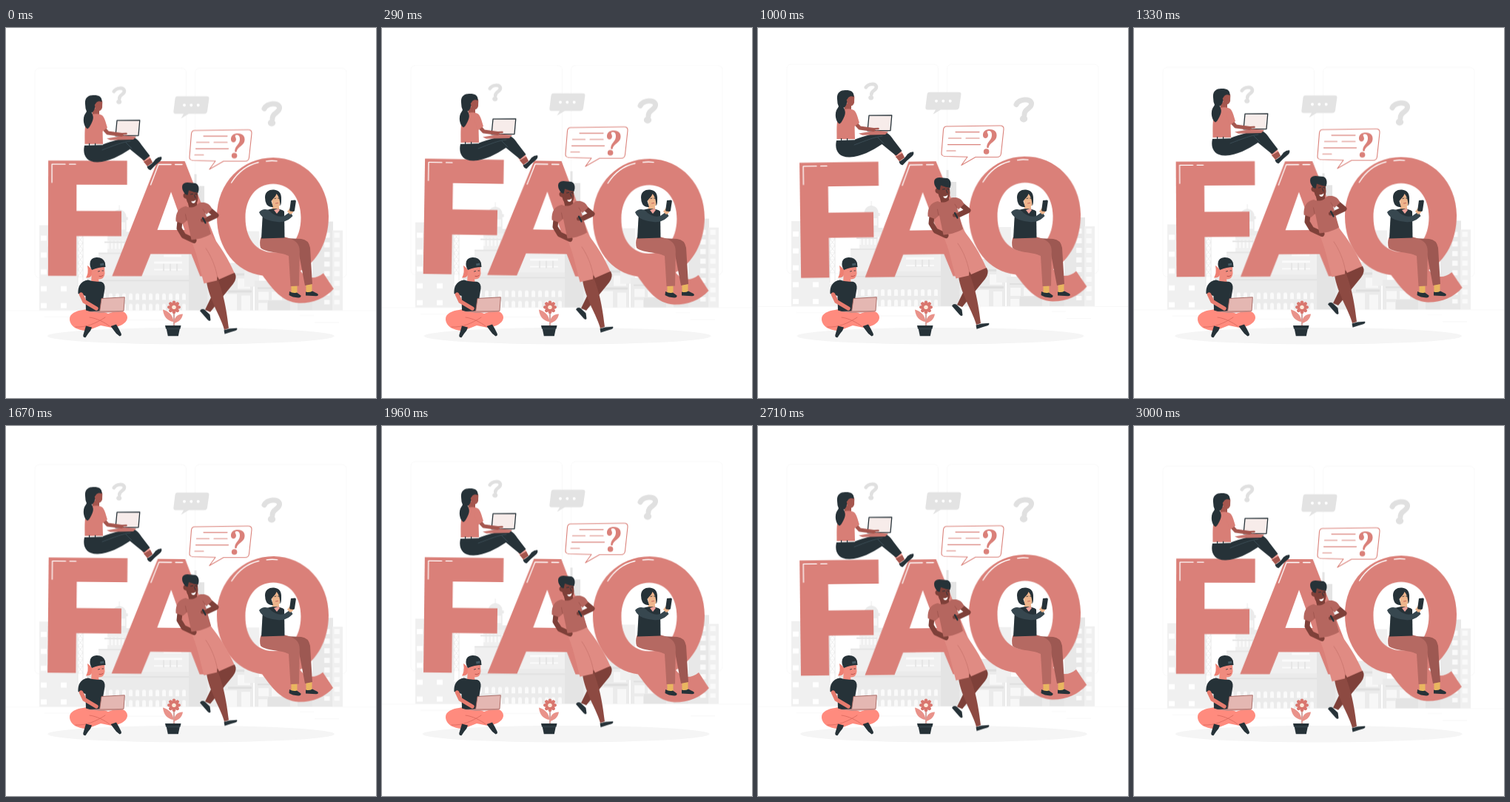
An HTML page for the animation above (3.04 s loop, 500 by 500 pixels).

```html
<!DOCTYPE html>
<html lang="en">
<head>
<meta charset="utf-8">
<title>FAQ</title>
<style>
  html, body { margin: 0; width: 100%; height: 100%; overflow: hidden; background: #fff; }
  svg { display: block; width: 100vw; height: 100vh; }

  .float, .drift, .wind, .shake {
    animation: float 1.5s linear infinite paused;
    animation-delay: calc(var(--clock, 42) * -1ms);
    transform-origin: 250px 250px;
  }
  .drift { animation-duration: 3s; }
  .wind { animation-name: wind; }
  .shake { animation-name: shake; }

  @keyframes float { 50% { transform: translateY(-10px); } }
  @keyframes wind {
    0%, 100% { transform: rotate(0deg); }
    25% { transform: rotate(1deg); }
    75% { transform: rotate(-1deg); }
  }
  @keyframes shake {
    0%, 100% { transform: translateX(0); }
    10%, 90% { transform: translateX(-1px); }
    20%, 80% { transform: translateX(2px); }
    30%, 50%, 70% { transform: translateX(-4px); }
    40%, 60% { transform: translateX(4px); }
  }

  .ink { fill: #263238; }
  .rose { fill: #da8079; }
  .line { fill: none; stroke-linecap: round; stroke-linejoin: round; }
</style>
</head>
<body>
<svg viewBox="0 0 500 500" xmlns="http://www.w3.org/2000/svg">
  <defs>
    <pattern id="panes" x="47" y="280" width="27" height="22.8" patternUnits="userSpaceOnUse">
      <path d="M0 1h8v7H0z" fill="#fff"/>
    </pattern>
    <pattern id="slots" x="428" y="277" width="13.5" height="13" patternUnits="userSpaceOnUse">
      <path d="M2 0h7.5v7H2z" fill="#fafafa"/>
    </pattern>
    <pattern id="arches" x="128" y="358" width="9" height="14" patternUnits="userSpaceOnUse">
      <path d="M2 10V3.5a2.5 2.5 0 0 1 5 0V10z" fill="#fafafa"/>
    </pattern>
    <pattern id="columns" x="126" y="284" width="5" height="60" patternUnits="userSpaceOnUse">
      <path d="M1 3h2.4v12H1z" fill="#fafafa"/>
    </pattern>
    <pattern id="truss" x="97" y="282" width="7" height="9" patternUnits="userSpaceOnUse">
      <path d="M0 0L7 9M7 0L0 9M0 0H7" stroke="#e3e3e3" stroke-width=".7"/>
    </pattern>
  </defs>

  <!-- room, skyline and floor -->
  <g class="float">
    <g fill="none" stroke="#ebebeb" stroke-width=".3">
      <rect x="39" y="55" width="204.5" height="282.8" rx="5.7"/>
      <rect x="255.5" y="55" width="204.5" height="282.8" rx="5.7"/>
    </g>
    <g fill="#f0f0f0">
      <path d="M45 267h52v115H45z"/>
      <path d="M45 267h52v115H45z" fill="url(#panes)"/>
      <path d="M97 272h7v65h-7z" fill="url(#truss)"/>
      <path d="M97 282V350M104 282V350" stroke="#e3e3e3" stroke-width=".8"/>
      <path d="M152.6 240h1v6c6 1 9 5 9 10h2v4h-2v16h6v9h-31v-9h6v-16h-2v-4h2c0-5 3-9 9-10z" fill="#ebebeb"/>
      <path d="M146 263h15v10h-15z" fill="#f7f7f7"/>
      <path d="M137 282h68v54h-68zM125 306h20v30h-20z"/>
      <path d="M137 288h40v18h-40z" fill="url(#columns)"/>
      <path d="M133 289h28v2h-28zM125 304h40v2h-40z" fill="#e6e6e6"/>
      <path d="M190 305h58v34h-58z"/>
      <path d="M213 307h24v3h-24zM200 316h38v3h-38zM200 326h38v2h-38z" fill="#fafafa"/>
      <path d="M212 319h2v10h-2zM221 319h2v10h-2zM230 319h2v10h-2z" fill="#e6e6e6"/>
      <path d="M109 335h139v47H109z" fill="#ebebeb"/>
      <path d="M109 341h139v1.5H109z" fill="#e0e0e0"/>
      <path d="M128 358h117v24H128z" fill="url(#arches)"/>
      <path d="M84 352h44v30H84z" fill="#f0f0f0"/>
      <path d="M254.5 198h3v16h-3zM250 214h18v30h-18zM247 244h25v138h-25z" fill="#e4e4e4"/>
      <path d="M272 318h62v64h-62z" fill="#ebebeb"/>
      <path d="M276 332h56v3h-56zM300 355h32v3h-32z" fill="#dfdfdf"/>
      <path d="M313 339h17v14h-17zM292 360h20v22h-20zM318 362h12v20h-12z" fill="#f7f7f7"/>
      <path d="M322 275h20v75h-20z"/>
      <path d="M336 342h92v40h-92z" fill="#ebebeb"/>
      <path d="M340 351h32v2h-32z" fill="#e0e0e0"/>
      <path d="M341 357h14v11h-14zM359 357h14v11h-14zM341 372h12v10h-12z" fill="#f7f7f7"/>
      <path d="M354 369h30v13h-30zM394 367h41v15h-41z" fill="#e4e4e4"/>
      <path d="M414 262h28v120h-28z" fill="#e8e8e8"/>
      <path d="M441 274h14v108h-14z"/>
      <path d="M428 277h27v97h-27z" fill="url(#slots)"/>
    </g>
    <path d="M0 382.4h500M417 398.5h33M397 389.2h19M52 390.9h43M131 395h94" fill="none" stroke="#ebebeb" stroke-width=".35"/>
  </g>

  <ellipse class="shake" cx="250" cy="416.2" rx="193.9" ry="11.3" fill="#f5f5f5"/>

  <!-- letters -->
  <g class="wind">
    <path class="rose" d="M57 179.4H163.6V212H95.3V247.5H156V281.5H95.3V335.2H57z"/>
    <path class="rose" fill-rule="evenodd" d="M204.500 180H241.500L302.500 335.500H262.500L250.500 305.500H195.500L183.500 335.500H143.500zM223 221.500L204.500 273H241.500z"/>
    <path class="rose" fill-rule="evenodd" d="M361 175C403 175 436 209 436 254C436 288 421 315 398 328C407 339 418 340 429 331L443 352C432 365 414 372 396 371.500C373 370 361 353 347 334.500C311 330 285 298 285 255C285 209 319 175 361 175zM361 210.500C338 210.500 323.500 230 323.500 256C323.500 284 338 303 361 303C384 303 398.500 284 398.500 256C398.500 230 384 210.500 361 210.500z"/>
    <path class="line" stroke="#fff" stroke-width="1.3" d="M62 209V184.300H80M85.500 184.300H94M195.500 212L206 184.500H223M228.500 184.500H238M304.500 209Q318 187 341 181.500M351.500 179.800Q358 178.800 366 179.600"/>
  </g>

  <!-- floating marks -->
  <g class="float">
    <g class="line" stroke="#e0e0e0" stroke-linecap="butt">
      <path stroke-width="4.600" d="M145.800 86.300C149 81 158.500 80.400 159.900 85C160.800 90.800 152.800 90 153.200 96.200"/>
      <path stroke-width="7" d="M349 109.500C353 102 367.500 100.500 369.500 107.500C370.500 115.500 359.500 114.500 360 123"/>
    </g>
    <g fill="#e0e0e0">
      <ellipse cx="152.700" cy="100.300" rx="3.500" ry="3.100"/>
      <ellipse cx="359" cy="128.700" rx="5.200" ry="4.700"/>
    </g>
    <path fill="#e3e3e3" d="M231.500 92.700H271.500Q274.800 92.700 274.400 96L272 113Q271.500 116.400 268 116.400H247L236.500 122.700L240 116.400H229Q225.900 116.400 226.400 113L228.500 96Q229 92.700 231.500 92.700z"/>
    <g fill="#fff"><circle cx="241" cy="104.800" r="2"/><circle cx="250.300" cy="104.800" r="2"/><circle cx="259.700" cy="104.800" r="2"/></g>
    <path fill="#fff" stroke="#da8079" stroke-width="1.100" stroke-linejoin="round" d="M255 139L327 138Q332.500 138 332 143L328.500 175.500Q328 180.500 323 180.500H294L274.800 191.500L283 180.300L252.500 179.500Q247.500 179 248 174.500L250.500 143.500Q251 139 255 139z"/>
    <path class="line" stroke="#da8079" stroke-width="1.100" d="M267 146.600H299M257.500 155H274.500M281 155H299M256.500 163.600H300.500M255 172H267"/>
    <path class="rose" d="M304 151.500C303.500 145.500 308 143 313.500 143C319.500 143 323 146.500 322.500 152C322 160 312.500 160.500 311.500 168H309.300C308.300 160.500 315.500 158.500 316 151.500C316.300 147 314.500 145 311.800 145C309.500 145 309 146.500 310.300 148.500C312 152 310 155 307.500 155C305.500 155 304.200 153.500 304 151.500z"/>
    <circle class="rose" cx="308.600" cy="173" r="3.800"/>
  </g>

  <!-- woman with laptop -->
  <g class="drift">
    <path fill="#f4a39b" d="M184 178L193 172L198 182L191 187z"/>
    <path fill="#a5564e" d="M186 181L195 176L198 182L191 187z"/>
    <path class="ink" d="M190.500 187.500C195 186 200 181 202 177.500Q206 174 210 174.200Q211.300 177 208.500 180L201 186.500L195.500 192.300Q191.500 191.500 190.500 187.500z"/>
    <path class="ink" d="M106 159L130 158C144 152.500 158 149 169 147.500C175 147.500 179 152 183 158L194.500 173L186.500 179.500L167.500 164C154 173 139 181 124 181.500C109 182 103 172 106 159z"/>
    <path class="line" stroke="#455a64" stroke-width=".7" d="M130 165C146 159 158 154 168 153M170 163L162 155"/>
    <path fill="#a5564e" d="M116 110L126 108L126 119L117 121z"/>
    <path fill="#a5564e" d="M118 98Q128 93 130.300 100L130 108Q128 114 121 112z"/>
    <path fill="#d87e76" d="M115 117.500C121 115.500 129 116 131.500 120C134 124 135.500 130 136.500 134L130.500 139L131 157.500H106.500C107 146 104 125 115 117.500z"/>
    <path fill="none" stroke="#fff" stroke-width="1.100" d="M106.500 157.700H131"/>
    <path fill="#263238" d="M112 156h1.200v3h-1.200zM120 156h1.200v3h-1.200z"/>
    <path class="ink" d="M107 103C106 94 112 90.500 119 91C126 91 130 93.500 129.500 100C125 98 121 100 120.500 105C120 111 118 114 115.500 114.500C120 121 117 126 114.500 131C113 134 111.500 136 110 136.500C105 133 103.500 124 106 118L109 113Q107 109 107 103z"/>
    <circle cx="121.500" cy="104.500" r="1.700" fill="#a5564e"/>
    <path fill="#f7ecea" stroke="#263238" stroke-width="1.300" stroke-linejoin="round" d="M150 125.200L180.800 124.800L179 145.500L148 145.800z"/>
    <path fill="#c9756e" d="M136 149.500L160 145.500L176 147L172 151L141 151.800z"/>
    <path class="line" stroke="#a5564e" stroke-width="5" d="M132 136L137.500 142L156 144.500"/>
    <path class="line" stroke="#a5564e" stroke-width="2.500" d="M153 143.500L162.500 143"/>
    <path fill="#d87e76" d="M124 125Q131 121 133 126L137 135L129.500 140.500z"/>
  </g>

  <!-- leaning man -->
  <g class="drift">
    <path fill="#7e4039" d="M284 334L309 331Q313 338 307 346L276 384L269 381L284 350z"/>
    <path fill="#8d4a42" d="M271 343L286 339C291 352 297 370 301 406L295 408C292 394 274 366 271 343z"/>
    <path class="ink" d="M262 382.500Q264 379 268 380.500L275.500 387.500L276.500 395Q275 397.500 272 394z"/>
    <path class="ink" d="M294.500 408.500L302 406.500L312 405.700Q313.500 407.500 310 409.300L304 411L295.500 413.800z"/>
    <path fill="#e08b83" d="M249.500 286L276 278C289 294 301 313 308.500 331L288 340L285.500 335.500L285 341.500L267.500 345.500C262 325 258 304 249.500 286z"/>
    <path class="line" stroke="#c9756e" stroke-width=".8" d="M285.500 336C283 322 277 308 270 298"/>
    <path fill="#7e4039" d="M245 233L257 230L259 243L248 246z"/>
    <path class="line" stroke="#7e4039" stroke-width="7" d="M235 261L234 271L240 281L254 287.500"/>
    <path class="line" stroke="#7e4039" stroke-width="7" d="M275 246L284 253.500L268 261"/>
    <path fill="#b5665f" d="M243 241C250 244.500 257 242 261 236.500C269 235 275 237 278.500 245L271 252L269 250L277 278.500C268 284 258 286 250.500 286.500L245 260L239 265L229.500 261.500C229 250 233 243 243 241z"/>
    <path class="line" stroke="#9c534d" stroke-width=".8" d="M244 260L242.500 252M269 250L266 245"/>
    <path class="line" stroke="#7e4039" stroke-width="5" d="M272 259.500L265.500 260"/>
    <path class="line" stroke="#263238" stroke-width="2.400" d="M266 257L269.500 263.500"/>
    <path fill="#7e4039" d="M242 218L258.500 217.500L259.500 230Q259 240 252.500 240.500Q245 239 243.500 231Q239 230 239.500 226Q240 223 243 224z"/>
    <path class="ink" d="M238 215Q238 209.500 245 209L256 210Q261 212 260.500 219L259.500 223Q253 222 247 219.500L245.500 226L242.500 225Q238 220 238 215z"/>
    <path fill="#fff" d="M250 234.500Q254 235 256.500 232.500Q256 237 253 237Q251 236.700 250 234.500z"/>
    <path class="line" stroke="#263238" stroke-width=".9" d="M249.500 225L252.500 224.500M255.500 224.500L258 225M254.500 226L256 230"/>
  </g>

  <!-- woman with phone -->
  <g>
    <path fill="#e9b660" d="M385.500 347h8v11h-8zM405.500 345h8v12h-8z"/>
    <path class="ink" d="M383 356Q388 359 393 357.500L398.500 361.500Q399 364.500 395 364.500Q387 364 382.500 361zM405 356.500Q410 358 414 355.500L421 359Q423.500 362 419 362.300L405 361.500z"/>
    <path fill="#9d5852" d="M378 284L399 285Q409 286 411 297L414 346L404 348L396 306z"/>
    <path fill="#b56962" d="M344.500 283L377 282.500C390 286 397 290 396.800 302L396 348.500L384.500 349L382 308C370 302 351 304 344 297Q342 290 344.500 283z"/>
    <path fill="#eeb58c" d="M359 238L368 236L370 249L361 251z"/>
    <path class="ink" d="M347 249C354 243 371 243 376 248L376.500 283.500L345 284.500z"/>
    <path fill="#f0a39b" d="M362 246L366 251L370 246L368 244z"/>
    <path fill="#37474f" d="M342 249C346 244 353 244 357 248C362 253 369 256 376 254L384 248.500L387.500 254C382 260 375 263 367 262C358 261 346 259 342 249z"/>
    <path fill="#eeb58c" d="M380 248L385.500 241L390 243.500L387.500 250L384 252z"/>
    <path class="ink" d="M385 233L390.500 232.600Q392 232.800 391.800 234.500L390 246.500Q389.700 248 388 248L384 247.600Q383 247.400 383.200 246z"/>
    <path fill="#eeb58c" d="M358 225L369 223L371.500 232L370 240Q365 243 360 239z"/>
    <path class="ink" d="M350 229C350 221 356 218 362 218.500C369 219 372.500 224 372 231C372 236 372 238 370.500 240.500C370.500 234 369 228 365.500 224C364 229 360 231 358.500 234L361 242Q355 242.500 352 238Q350 234 350 229z"/>
    <path class="line" stroke="#263238" stroke-width=".8" d="M363 230.500L365 230M367.500 230L369 230.300"/>
    <path class="line" stroke="#c9655c" stroke-width="1" d="M364.500 237L367.500 236.500"/>
  </g>

  <!-- boy with laptop -->
  <g>
    <path fill="#ee7f72" d="M110 321C114 324 117 326 117 332Q115 338 108 337.500Q112 332 110 321z"/>
    <path fill="#f08b7e" d="M116 324L133 322L133.500 332Q132.500 340 125 339.500L126 346L115 346z"/>
    <path class="ink" d="M113.500 318Q114 310.500 122 310Q131 309.500 133.800 317L134.500 323Q125 323 116 327Q113 322 113.500 318z"/>
    <path fill="#455a64" d="M127 318.500L132 317.500L132.500 320.500L127.500 321.500z"/>
    <path class="line" stroke="#263238" stroke-width=".8" d="M124.500 329L126.500 328.500M130 328L131.500 328"/>
    <path class="line" stroke="#b84f48" stroke-width=".9" d="M126 335.500Q129 336.500 131 334.500"/>
    <path fill="#ff8b7e" d="M104 381C115 378 130 383 138 386L150 382C160 381 164.500 387 164 392C163 400 152 404 143 405L128 402L110 409C95 409 86 402 86 393C86 386 95 382 104 381z"/>
    <path class="line" stroke="#dd6b60" stroke-width=".9" d="M94 404C108 405 122 399 134 391M140 403C134 398 122 392 113 391"/>
    <path class="ink" d="M108 402.500L116 404.500Q115 409 111 413L107.500 418.200Q104 418.500 104.300 415zM141.500 403L149 400.500Q152.500 406 155.500 412.500Q157 416 153.500 416.500Q149 414 146 409z"/>
    <path class="ink" d="M111 340.500C118 343 125 342.500 129 343Q134 345 133.500 352L131.500 364L129 382Q117 385 108 381.500L107.500 362L97.500 359C97 350 100 342 111 340.500z"/>
    <path class="line" stroke="#e67b6e" stroke-width="5.400" d="M101.500 360L106 369.500L122 379"/>
    <path fill="#e4b7b2" stroke="#a4645e" stroke-width=".9" stroke-linejoin="round" d="M129 365.500L160.300 363.800L159 382.300L126.500 383.300z"/>
    <path fill="#c78c87" d="M110 383L126.500 382.500L159 382.200L157 383.800L127 385z"/>
  </g>

  <!-- potted flower -->
  <g>
    <path class="line" stroke="#b5665f" stroke-width="1.200" d="M227 402V382"/>
    <path fill="#e9928a" d="M226.500 397C218 396 213 390 212 380.500C220 383 226 388 226.500 397zM227 399C227 391 231 387 239 386.500C238 393 234 397 227 399z"/>
    <g id="petals" transform="translate(227 377.300)"></g>
    <circle cx="227" cy="377.300" r="2.600" fill="#fbe9d8"/>
    <path class="ink" d="M215 402H236.500L235.500 406.500H234.800L232.800 416.300H218.800L216.800 406.500H216z"/>
    <path d="M217 406.600H234.600" stroke="#455a64" stroke-width=".6"/>
  </g>
</svg>
<script>
  const LOOP = 3040, STEP = 1000 / 24;

  const petals = document.getElementById('petals');
  for (let i = 0; i < 8; i++) {
    const petal = document.createElementNS('http://www.w3.org/2000/svg', 'ellipse');
    const look = { cy: -5.6, rx: 2.4, ry: 3.3, fill: '#d9766e', transform: `rotate(${i * 45})` };
    for (const key in look) petal.setAttribute(key, look[key]);
    petals.append(petal);
  }

  // Drives the paused keyframes at 24 steps a second, with a short hop at the loop's end.
  function tick(now) {
    const step = Math.floor((now % LOOP + 4) / STEP) % 73;
    document.documentElement.style.setProperty('--clock', (step + 1) * STEP);
    requestAnimationFrame(tick);
  }
  tick(performance.now());
</script>
</body>
</html>
```
